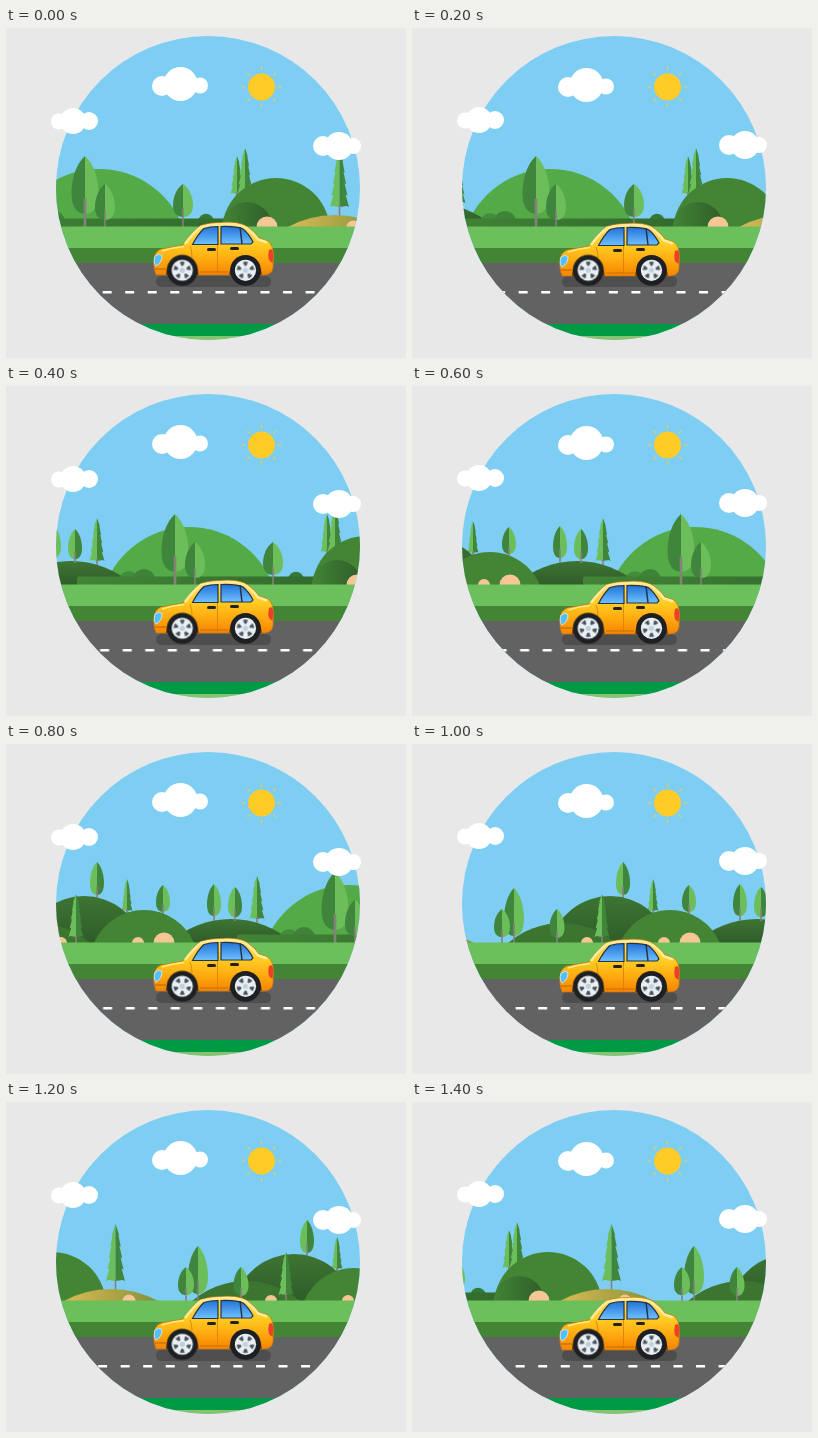
These frames come from a looping animation (400 px wide and 330 px high, 1.6 s). An HTML page:

```html
<!DOCTYPE html>
<html lang="en">
<head>
<meta charset="utf-8">
<title>Car ride</title>
<style>
html, body { margin: 0; width: 100%; height: 100%; overflow: hidden; background: #e8e8e8; }
svg { display: block; width: 400px; height: 330px; }
#land { animation: ride 1.6s step-end infinite; }
#dashes { animation: dash 1.6s step-end infinite; }
.up, .down, .wheel { animation: bob .4s step-end infinite; }
.up { --move: translateY(-1px); }
.down { --move: translateY(1px); }
.wheel { --move: rotate(36deg); }
@keyframes bob { 0% { transform: none; } 50%, 100% { transform: var(--move); } }
@keyframes ride {
  0% { transform: translateX(0); }
  12.5% { transform: translateX(45px); }
  25% { transform: translateX(90px); }
  37.5% { transform: translateX(190px); }
  50% { transform: translateX(250px); }
  62.5% { transform: translateX(370px); }
  75% { transform: translateX(460px); }
  87.5% { transform: translateX(550px); }
  100% { transform: translateX(684px); }
}
@keyframes dash {
  0%, 100% { transform: translateX(0); }
  12.5% { transform: translateX(10px); }
  25% { transform: translateX(-2.5px); }
  37.5% { transform: translateX(11.5px); }
  50% { transform: translateX(.5px); }
  62.5% { transform: translateX(7px); }
  75% { transform: translateX(18px); }
  87.5% { transform: translateX(7px); }
}
</style>
</head>
<body>
<svg viewBox="0 0 400 330">
  <defs>
    <clipPath id="disc"><circle cx="202" cy="160" r="152"/></clipPath>
    <linearGradient id="deep"><stop stop-color="#428435"/><stop offset="1" stop-color="#2f5d2a"/></linearGradient>
    <linearGradient id="dim" x2="0" y2="1"><stop stop-color="#3e7532"/><stop offset="1" stop-color="#2f5c2a"/></linearGradient>
    <linearGradient id="hedge"><stop stop-color="#428536"/><stop offset="1" stop-color="#326a2d"/></linearGradient>
    <linearGradient id="dune"><stop stop-color="#d8bb55"/><stop offset=".45" stop-color="#b5a748"/><stop offset="1" stop-color="#7f923c"/></linearGradient>
    <linearGradient id="paint" x2="0" y2="1"><stop stop-color="#ffe06a"/><stop offset=".42" stop-color="#ffcb22"/><stop offset=".7" stop-color="#ffab10"/><stop offset="1" stop-color="#f58400"/></linearGradient>
    <linearGradient id="glass" x2="0" y2="1"><stop stop-color="#2173d6"/><stop offset="1" stop-color="#6fc1ff"/></linearGradient>
    <g id="wheel">
      <circle r="15.4" fill="#1d1f22"/>
      <circle r="10.6" fill="#e9eff3"/>
      <g class="wheel" id="spokes"></g>
      <circle r="2.6" fill="#c3d0d9"/>
    </g>
  </defs>

  <g clip-path="url(#disc)">
    <rect width="400" height="330" fill="#7ecef4"/>
    <g id="land"><g id="strip"></g><use href="#strip" x="-684"/></g>
    <rect y="198.500" width="400" height="22" fill="#6bc05b"/>
    <rect y="220" width="400" height="15" fill="#438435"/>
    <rect y="235" width="400" height="61" fill="#626262"/>
    <g id="dashes"><path d="M29 264.2H400" stroke="#fff" stroke-width="2.4" stroke-dasharray="9 13.55"/></g>
    <rect y="296" width="400" height="12" fill="#009a44"/>
    <rect y="308" width="400" height="6" fill="#85c46f"/>
  </g>

  <g id="sun" stroke="#f5cf4c"><circle cx="255.5" cy="59" r="13.5" fill="#ffcb27" stroke="none"/></g>
  <g id="clouds" fill="#fff"></g>

  <rect x="150" y="248" width="115" height="11" rx="5.5" fill="#4e4e4e"/>
  <g class="down">
    <path d="M150 247Q147 240 148 232Q148 224 155 221L177 217Q186 204 194 198Q200 195 214 194.500Q234 193 242 199Q249 204 253 210L262 213Q267 217 267.500 227L267 240Q266 247 258 247Z" fill="url(#paint)" stroke="#c87510" stroke-width=".7"/>
    <path d="M179 216Q187 205 195 199Q204 196.300 215 196.200Q234 195.200 241 200.500Q248 206 252 211.500L261 214.500" fill="none" stroke="#ffeb9a" stroke-width="2.600"/>
    <path d="M156 223Q166 219.500 178 218.500" fill="none" stroke="#ffe98a" stroke-width="1.500"/>
    <path d="M186.500 216.500Q192 206 198 200.500Q204 198.500 212 198.500V216.500Z" fill="url(#glass)" stroke="#25324a" stroke-width="1.200"/>
    <path d="M215 198.500Q231 198 237 201Q243 206 247 214L245 216H215Z" fill="url(#glass)" stroke="#25324a" stroke-width="1.200"/>
    <path d="M234 199L236 216" stroke="#25324a" stroke-width="1.500"/>
    <path d="M211.500 217V246M184 218Q186 222 186 229" fill="none" stroke="#d97d00" stroke-width=".8"/>
    <path d="M194 244H222" stroke="#d87800" stroke-width="1.500"/>
    <g fill="#25211b"><rect x="201" y="220" width="9" height="3" rx="1.500"/><rect x="224" y="219" width="9" height="3" rx="1.500"/></g>
    <path d="M149 228Q153 225 156 227.500Q156 235 150 238Q147 235 149 228Z" fill="#55c0f8" stroke="#d6f0ff" stroke-width=".8"/>
    <path d="M263 222Q267 219 267.300 227L266.500 235Q260.500 233 263 222Z" fill="#ee3f2a"/>
    <path d="M148.500 241H160" stroke="#cf7300" stroke-width="1.500"/>
    <path d="M160 247A16.300 16.300 0 0 1 192.600 247ZM223.200 247A16.300 16.300 0 0 1 255.800 247Z" fill="#6b4312"/>
  </g>
  <use href="#wheel" x="176.300" y="242.300"/>
  <use href="#wheel" x="239.500" y="242.300"/>
</svg>
<script>
const BASE = 199, DARK = '#3f853c', LIGHT = '#6cbe5b';
const add = (id, markup) => document.getElementById(id).insertAdjacentHTML('beforeend', markup);
const path = (d, fill) => `<path d="${d}" fill="${fill}"/>`;

// Circle segment resting on the horizon
function hill(x, half, top, fill, base = BASE) {
  const h = base - top, r = (half * half + h * h) / (2 * h);
  return path(`M${x - half} ${base}A${r} ${r} 0 0 1 ${x + half} ${base}Z`, fill);
}
const dome = (x, r) => hill(x, r, BASE - r, '#f6c795');

const trunk = (x, from, to, w) =>
  `<path d="M${x} ${from}V${to}" stroke="#85817c" stroke-width="${w}"/>`;

function leaf(x, top, bottom, half) {
  const y = k => top + (bottom - top) * k;
  return `M${x} ${top}C${x + half * .7} ${y(.14)} ${x + half} ${y(.42)} ${x + half} ${y(.64)}` +
    `C${x + half} ${y(.88)} ${x + half * .6} ${bottom} ${x} ${bottom}Z`;
}

function fir(x, top, bottom, half) {
  let d = `M${x} ${top}`;
  for (let i = 1; i <= 5; i++) {
    const y = top + (bottom - top) * i / 5, w = half * (.25 + .15 * i);
    d += `L${x + w} ${y}L${x + w * .75} ${y - 1}`;
  }
  return d + `L${x} ${bottom}Z`;
}

function plant(shape, colors, x, top, bottom, half, foot) {
  const from = shape === leaf ? top + (bottom - top) * .73 : bottom - 2;
  return path(shape(x, top, bottom, -half), colors[0]) + path(shape(x, top, bottom, half), colors[1]) +
    trunk(x, from, foot, half > 11 ? 2.6 : 1.6);
}
const tree = (...a) => plant(leaf, [DARK, LIGHT], ...a);
const sunnyTree = (...a) => plant(leaf, [LIGHT, DARK], ...a);
const pine = (...a) => plant(fir, [LIGHT, DARK], ...a);

add('strip', [
  // wide bright hill, with a low dark one on its left
  hill(93, 84, 141, '#53aa47'),
  hill(-25, 62, 175, 'url(#dim)'),
  tree(-42, 140, 172, 7, 177), sunnyTree(-21, 143, 173, 7, 177), pine(1, 132, 175, 7.5, 179),
  hill(33, 9, 180, '#438c3c', 192), hill(48, 11, 183, '#3f8338', 193),
  hill(200, 7.5, 183, '#347a35', 192),
  `<rect x="-19" y="190.500" width="246" height="9" rx="2" fill="url(#hedge)"/>`,
  tree(79, 128, 186, 13.5, BASE), tree(99, 156, 192, 10, BASE), tree(177, 156, 189, 10, BASE),

  // round hill and dune
  pine(231, 128, 166, 6.5, 172), pine(239, 120, 166, 7.5, 172),
  hill(270, 54, 150, '#438534'), hill(241, 25, 174, 'url(#deep)'), dome(261, 10.5),
  pine(333.5, 122, 179, 9.5, 188),
  hill(329, 47, 187, 'url(#dune)'), dome(347, 6.5),

  // cluster of dark hills
  sunnyTree(525, 118, 151, 7, 156), pine(555, 135, 167, 5.5, 171), tree(591, 141, 168, 7, 173),
  hill(512, 60, 152, 'url(#dim)'),
  hill(464, 54, 179, '#3b7530'), hill(572, 50, 166, '#438435'),
  dome(489, 6), dome(566, 6), dome(592, 10.5),
  tree(416, 144, 192, 10, BASE), tree(404, 165, 193, 8, BASE),
  tree(459, 165, 194, 7.5, BASE), pine(504, 150, 193, 7.5, BASE)
].join(''));

const cloud = (move, ...puffs) => `<g class="${move}">` +
  puffs.map(([x, y, r]) => `<circle cx="${x}" cy="${y}" r="${r}"/>`).join('') + '</g>';
add('clouds',
  cloud('down', [174.5, 56, 17], [156, 58, 10], [194, 57.5, 8]) +
  cloud('up', [67, 93, 13], [53, 93.5, 8], [83, 93, 9]) +
  cloud('up', [333, 118, 14], [317, 118, 10], [347, 118, 8]));

for (let a = 0; a < 360; a += 45)
  add('sun', `<path d="M255.500 42.500V39" transform="rotate(${a} 255.500 59)"/>`);

for (let a = 0; a < 360; a += 72)
  add('spokes', `<path d="M-.9 -4.500L-2.500 -8.300A8.700 8.700 0 0 1 2.500 -8.300L.9 -4.500Z" fill="#47525b" transform="rotate(${a})"/>`);
</script>
</body>
</html>
```
